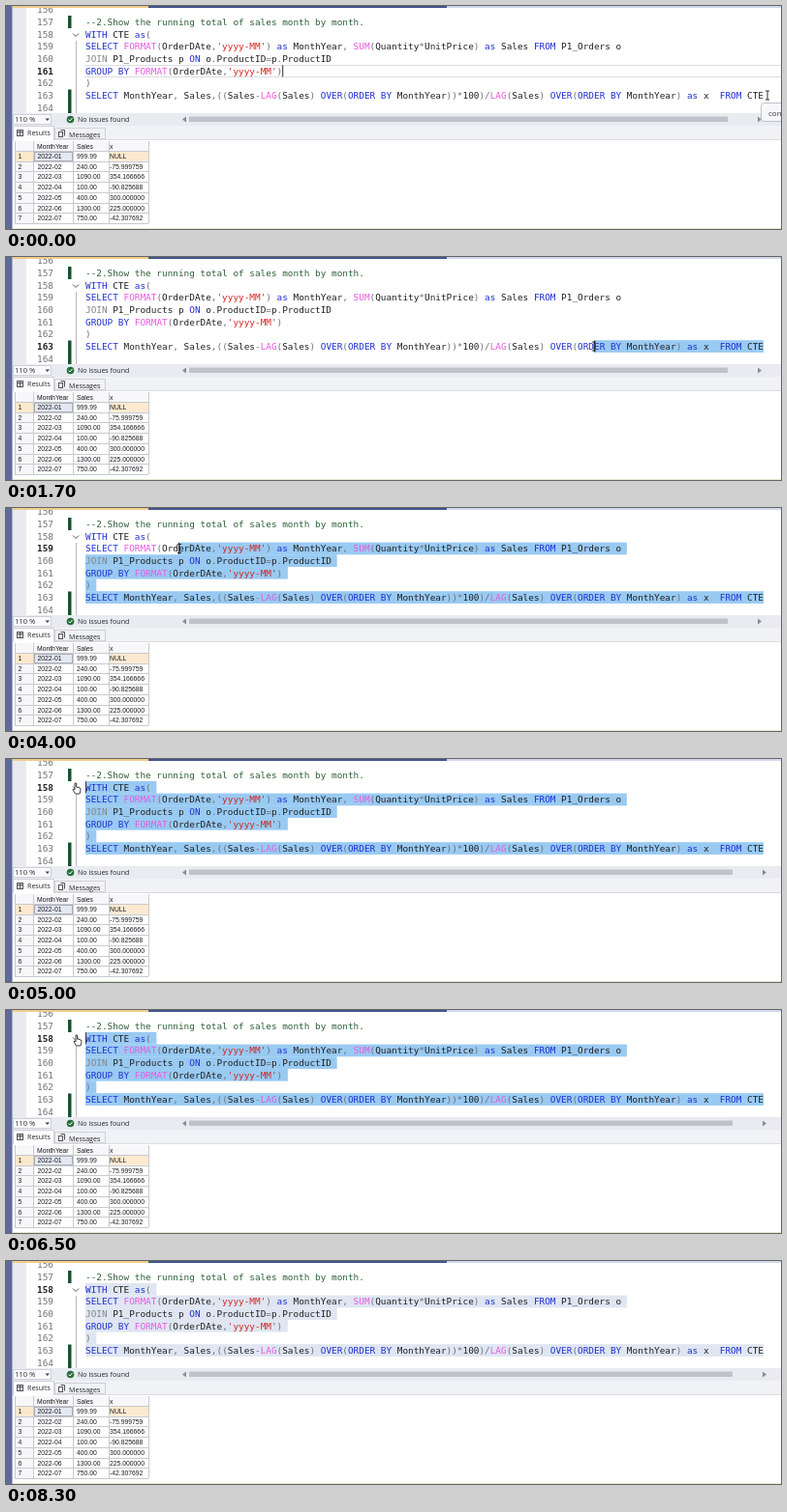
An HTML page with a canvas that plays this animation: 800 by 231 pixels, repeating every 8.4 s.

```html
<!DOCTYPE html>
<html lang="en">
<head>
<meta charset="utf-8">
<title>SQL editor selection</title>
<style>
html, body { margin: 0; width: 100%; height: 100%; overflow: hidden; background: #fff; }
canvas { display: block; }
</style>
</head>
<body>
<canvas id="stage" width="800" height="231"></canvas>
<script>
const ctx = document.getElementById('stage').getContext('2d');
const LOOP = 8400, STEP = 100;
const CODE_X = 82, CHAR = 5.645, PITCH = 12.65, FIRST = 157, LAST = 163;
const MONO = '"DejaVu Sans Mono", monospace';
const UI = '"Open Sans", sans-serif';
const GRID = '"Liberation Sans", Arial, sans-serif';

const code = [
  '--2.Show the running total of sales month by month.',
  'WITH CTE as(',
  "SELECT FORMAT(OrderDAte,'yyyy-MM') as MonthYear, SUM(Quantity*UnitPrice) as Sales FROM P1_Orders o",
  'JOIN P1_Products p ON o.ProductID=p.ProductID',
  "GROUP BY FORMAT(OrderDAte,'yyyy-MM')",
  ')',
  'SELECT MonthYear, Sales,((Sales-LAG(Sales) OVER(ORDER BY MonthYear))*100)/LAG(Sales) OVER(ORDER BY MonthYear) as x  FROM CTE'
];
const rows = [
  ['2022-01', '999.99', 'NULL'],
  ['2022-02', '240.00', '-75.999759'],
  ['2022-03', '1090.00', '354.166666'],
  ['2022-04', '100.00', '-90.825688'],
  ['2022-05', '400.00', '300.000000'],
  ['2022-06', '1300.00', '225.000000'],
  ['2022-07', '750.00', '-42.307692']
];

// Pointer path: time, x, y
const path = [
  [0, 786, 92.5], [1000, 784, 92.5], [1700, 607, 92.5], [2800, 284, 64.5],
  [4000, 179, 42], [4700, 84, 30], [5000, 73, 30], [6500, 74, 31], [7100, 80, -12]
];
const PRESS = 1000, RELEASE = 4800, BLUR = 7100;

const tokenRules = [
  [/^--.*/, '#2c5f36'],
  [/^'[^']*'/, '#d32626'],
  [/^(WITH|as|SELECT|FROM|ON|GROUP|BY|OVER|ORDER)\b/, '#2030d0'],
  [/^(FORMAT|SUM|LAG)\b/, '#e85ade'],
  [/^JOIN\b/, '#858585'],
  [/^\w+/, '#202024'],
  [/^[^\w\s']/, '#707074'],
  [/^\s+/, null]
];

function tokenize(line) {
  const tokens = [];
  for (let col = 0; col < line.length;) {
    const rest = line.slice(col);
    const [rule, color] = tokenRules.find(([r]) => r.test(rest));
    const text = rest.match(rule)[0];
    if (color) tokens.push({ text, color, col });
    col += text.length;
  }
  return tokens;
}
const tokens = code.map(tokenize);

const centerY = line => 16.6 + PITCH * (line - FIRST);
const columnX = col => CODE_X + CHAR * col;

function rect(x, y, w, h, color) {
  ctx.fillStyle = color;
  ctx.fillRect(x, y, w, h);
}
function text(str, x, y, size, family, color, weight = 400) {
  ctx.font = `${weight} ${size}px ${family}`;
  ctx.fillStyle = color;
  ctx.fillText(str, x, y);
}
function shape(points, fill, stroke, width = 1, close = true) {
  ctx.beginPath();
  points.forEach(([x, y]) => ctx.lineTo(x, y));
  if (close) ctx.closePath();
  if (fill) { ctx.fillStyle = fill; ctx.fill(); }
  if (stroke) { ctx.strokeStyle = stroke; ctx.lineWidth = width; ctx.stroke(); }
}
const polyline = (points, color, width) => shape(points, null, color, width, false);
function box(x, y, w, h, fill, stroke) {
  rect(x, y, w, h, fill);
  ctx.strokeStyle = stroke;
  ctx.lineWidth = 1;
  ctx.strokeRect(x + .5, y + .5, w - 1, h - 1);
}

function pointerAt(t) {
  const i = path.findIndex(p => p[0] > t);
  if (i < 0) return { x: path.at(-1)[1], y: path.at(-1)[2] };
  const [t0, x0, y0] = path[i - 1], [t1, x1, y1] = path[i];
  const k = (t - t0) / (t1 - t0);
  return { x: x0 + (x1 - x0) * k, y: y0 + (y1 - y0) * k };
}

function caretAt(t) {
  if (t < PRESS) return { line: 161, col: code[4].length };
  if (t >= 4700) return { line: 158, col: 0 };
  const { x, y } = pointerAt(t);
  const line = Math.max(158, Math.min(LAST, Math.round((y - 16.6) / PITCH) + FIRST));
  const col = Math.round((x - CODE_X) / CHAR);
  return { line, col: Math.max(0, Math.min(code[line - FIRST].length, col)) };
}

function drawSelection(caret, color) {
  for (let line = caret.line; line <= LAST; line++) {
    const from = line === caret.line ? caret.col : 0;
    const to = code[line - FIRST].length + (line < LAST ? 1 : 0);
    rect(columnX(from), centerY(line) - PITCH / 2, CHAR * (to - from), PITCH + .1, color);
  }
}

function drawEditor(t, caret) {
  rect(7, 0, 14, 111, '#e9eaef');
  if (t < PRESS) {
    rect(81, 61, 719, 1, '#dcdce2');
    rect(81, 73, 719, 1, '#dcdce2');
  } else {
    drawSelection(caret, t < BLUR ? '#99caf2' : '#dfe6f2');
  }
  rect(64, 10, 3.5, 13, '#17532c');
  rect(64, 86.5, 3.5, 24.5, '#17532c');
  rect(72, 36, 1, 75, '#b8b8be');
  polyline([[69, 28.5], [72, 31.5], [75, 28.5]], '#55555a', 1);

  for (let n = 156; n <= 164; n++) {
    const current = n === caret.line;
    text(n, 32, centerY(n) + 3.4, 9.38, MONO, current ? '#202024' : '#6d7477', current ? 700 : 400);
  }
  tokens.forEach((line, i) => {
    for (const { text: str, color, col } of line)
      text(str, columnX(col), centerY(FIRST + i) + 3.4, 9.38, MONO, color);
  });
  if (t < BLUR) rect(columnX(caret.col), centerY(caret.line) - 6, 1, 12, '#303034');

  rect(7, 0, 140, 2, '#efce8c');
  rect(147, 0, 308, 2, '#43558c');
  rect(455, 0, 345, 2, '#d2d9ee');
}

function drawStatusBar(t) {
  const shift = t >= 4500 ? 5 : 0;
  rect(7, 111, 793, 13, '#e9ebf1');
  box(7, 112, 40, 11, '#fafafc', '#ced1da');
  text('110 %', 9, 120.4, 7.6, UI, '#303034');
  shape([[40.5, 116.5], [45, 116.5], [42.75, 119]], '#404045');
  ctx.beginPath();
  ctx.arc(66.5, 117.5, 3.8, 0, 7);
  ctx.fillStyle = '#28703c';
  ctx.fill();
  polyline([[64.6, 117.6], [66, 119], [68.5, 116]], '#fff', 1);
  text('No issues found', 74, 120.4, 7.1, UI, '#28282c');
  shape([[186, 114.5], [186, 120.5], [182, 117.5]], '#8a8c94');
  rect(189, 114.5, 556 + shift, 5.5, '#c0c2c9');
  shape([[776 + shift, 114.5], [776 + shift, 120.5], [780 + shift, 117.5]], '#8a8c94');
}

function drawTabs() {
  rect(7, 124, 793, 15, '#f1f2f5');
  box(50, 126, 53, 12, '#f1f2f5', '#d0d0d5');
  rect(7, 138, 793, 1, '#dcdde2');
  box(7, 124, 43, 15, '#fff', '#d0d0d5');
  rect(8, 138, 41, 1, '#fff');
  box(11, 128, 7, 7, '#fff', '#505258');
  rect(11, 130, 7, 1, '#505258');
  rect(14, 128, 1, 7, '#505258');
  text('Results', 22, 134.3, 7.1, UI, '#28282c');
  box(54, 130, 5, 6, '#fff', '#505258');
  polyline([[56.5, 128.5], [60.5, 128.5], [60.5, 134.5]], '#505258', 1);
  text('Messages', 65, 135.6, 7.1, UI, '#28282c');
}

function drawResults() {
  const edges = [9, 28, 69, 106, 147], top = 150, pitch = 10.7;
  const put = (str, x, y) => text(str, x, y, 6.8, GRID, '#1c1c20');
  rect(9, 140, 138, 10, '#f7f7f9');
  ['MonthYear', 'Sales', 'x'].forEach((s, i) => put(s, [32, 73, 107][i], 147.6));
  rect(9, top, 19, pitch * 7, '#f7f7f9');
  rect(9, top, 19, pitch, '#fde8cc');
  rect(28, top, 41, pitch, '#e3e8f3');
  rect(106, top, 41, pitch, '#fce9cf');
  for (let i = 0; i <= 7; i++) rect(9, Math.round(top + pitch * i), 138, 1, '#c9cad0');
  edges.forEach(x => rect(x, 140, 1, 85, '#c9cad0'));
  ctx.setLineDash([1, 1]);
  ctx.strokeStyle = '#6c7078';
  ctx.lineWidth = 1;
  ctx.strokeRect(29.5, 151.5, 39, 9);
  ctx.setLineDash([]);
  rows.forEach((row, i) => {
    const y = top + pitch * i + 8;
    put(i + 1, 12.5, y);
    row.forEach((s, j) => put(s, [32.5, 73, 107][j], y));
  });
}

function drawTooltip() {
  ctx.beginPath();
  ctx.roundRect(779.5, 100.5, 30, 19, 3);
  ctx.fillStyle = '#f6f7fa';
  ctx.fill();
  ctx.strokeStyle = '#bfc2cb';
  ctx.lineWidth = 1;
  ctx.stroke();
  text('con', 787, 114, 8, UI, '#38383c');
}

function drawPointer(t) {
  const { x, y } = pointerAt(t);
  ctx.save();
  ctx.translate(x, y);
  if (t < RELEASE) {
    polyline([[-2, -4.5], [2, -4.5]], '#303034', 1);
    polyline([[0, -4.5], [0, 4.5]], '#303034', 1);
    polyline([[-2, 4.5], [2, 4.5]], '#303034', 1);
  } else {
    shape([[-2, -5], [-.5, -5], [-.5, -1], [3.5, 0], [4, 2], [3, 6], [-1.5, 6], [-4, 2], [-3.5, 1], [-2, 2]],
      '#fff', '#303034', .9);
  }
  ctx.restore();
}

function draw(t) {
  const caret = caretAt(t);
  rect(0, 0, 800, 231, '#fff');
  drawEditor(t, caret);
  drawStatusBar(t);
  drawTabs();
  drawResults();
  rect(7, 230, 793, 1, '#dcebd0');
  rect(0, 0, 6.5, 231, '#5d6b99');
  if (t < 700) drawTooltip();
  if (t < BLUR) drawPointer(t);
}

const start = performance.now();
function tick() {
  const t = (performance.now() - start) % LOOP;
  draw(Math.floor(t / STEP) * STEP);
  requestAnimationFrame(tick);
}
tick();
</script>
</body>
</html>
```
